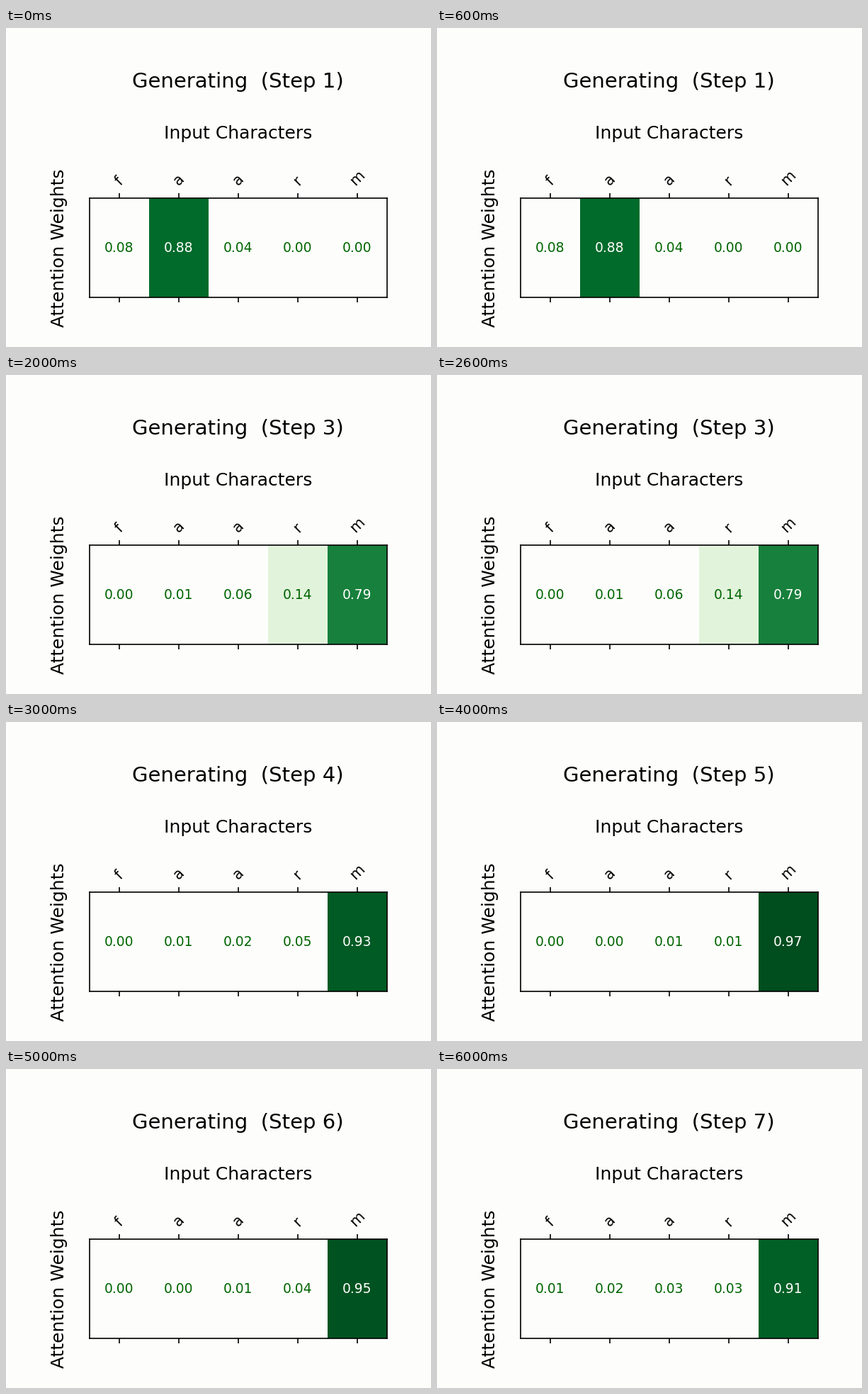
Recreate the animation shown at these times as a matplotlib script. Size 600 by 450 pixels, loop 7 s.

```python
import matplotlib.pyplot as plt
import numpy as np
from matplotlib.animation import FuncAnimation

W, H, DPI = 600, 450, 150
PAPER = "#fdfefc"
CHARS = "faarm"
LEFT, BOTTOM, WIDTH, HEIGHT = 117.8, 70, 419.8, 140  # heatmap in pixels

# Attention spilled outside the focused character, and how fast it fades
SPILL = [0.122, 0.48, 0.208, 0.0725, 0.029, 0.05, 0.088]
FADE = [0.87, 0.48, 0.295, 0.27, 0.16, 0.43, 0.083]

plt.rcParams["font.family"] = "DejaVu Sans"
fig = plt.figure(figsize=(W / DPI, H / DPI), dpi=DPI, facecolor=PAPER)
ax = fig.add_axes([LEFT / W, BOTTOM / H, WIDTH / W, HEIGHT / H],
                  facecolor=PAPER)


def attention(step):
    """Share the spill along a bell curve; the focus keeps the rest."""
    center = 0.8 if step == 0 else len(CHARS) - 1
    focus = round(center)
    row = np.exp(-FADE[step] * (np.arange(len(CHARS)) - center) ** 2)
    row[focus] = 0
    row *= SPILL[step] / row.sum()
    row[focus] = 1 - SPILL[step]
    return row


def visible(row):
    """Hide the faint weights so the paper shows through."""
    return np.ma.masked_less(row[np.newaxis, :], 0.1)


def heading(baseline, size, text=""):
    x = LEFT + WIDTH / 2
    return fig.text(x / W, 1 - baseline / H, text, fontsize=size,
                    ha="center", va="baseline")


image = ax.imshow(visible(attention(0)), cmap="Greens", vmin=0, vmax=1,
                  aspect="auto", interpolation="nearest")
ax.set_xticks(range(len(CHARS)), list(CHARS), rotation=45)
ax.tick_params(axis="x", top=True, bottom=True,
               labeltop=True, labelbottom=False)
ax.set_yticks([])
ax.set_ylabel("Attention Weights", fontsize=12, labelpad=15)

heading(156, 12, "Input Characters")
title = heading(84, 14)
values = [ax.text(i, 0, "", fontsize=9, ha="center", va="center")
          for i in range(len(CHARS))]


def draw(step):
    row = attention(step)
    image.set_data(visible(row))
    title.set_text(f"Generating  (Step {step + 1})")
    for label, weight in zip(values, row):
        label.set_text(f"{weight:.2f}")
        label.set_color(PAPER if weight > 0.5 else "darkgreen")
    return [image, title, *values]


anim = FuncAnimation(fig, draw, frames=len(SPILL), interval=1000,
                     repeat=True, repeat_delay=0, blit=False)
plt.show()
```
